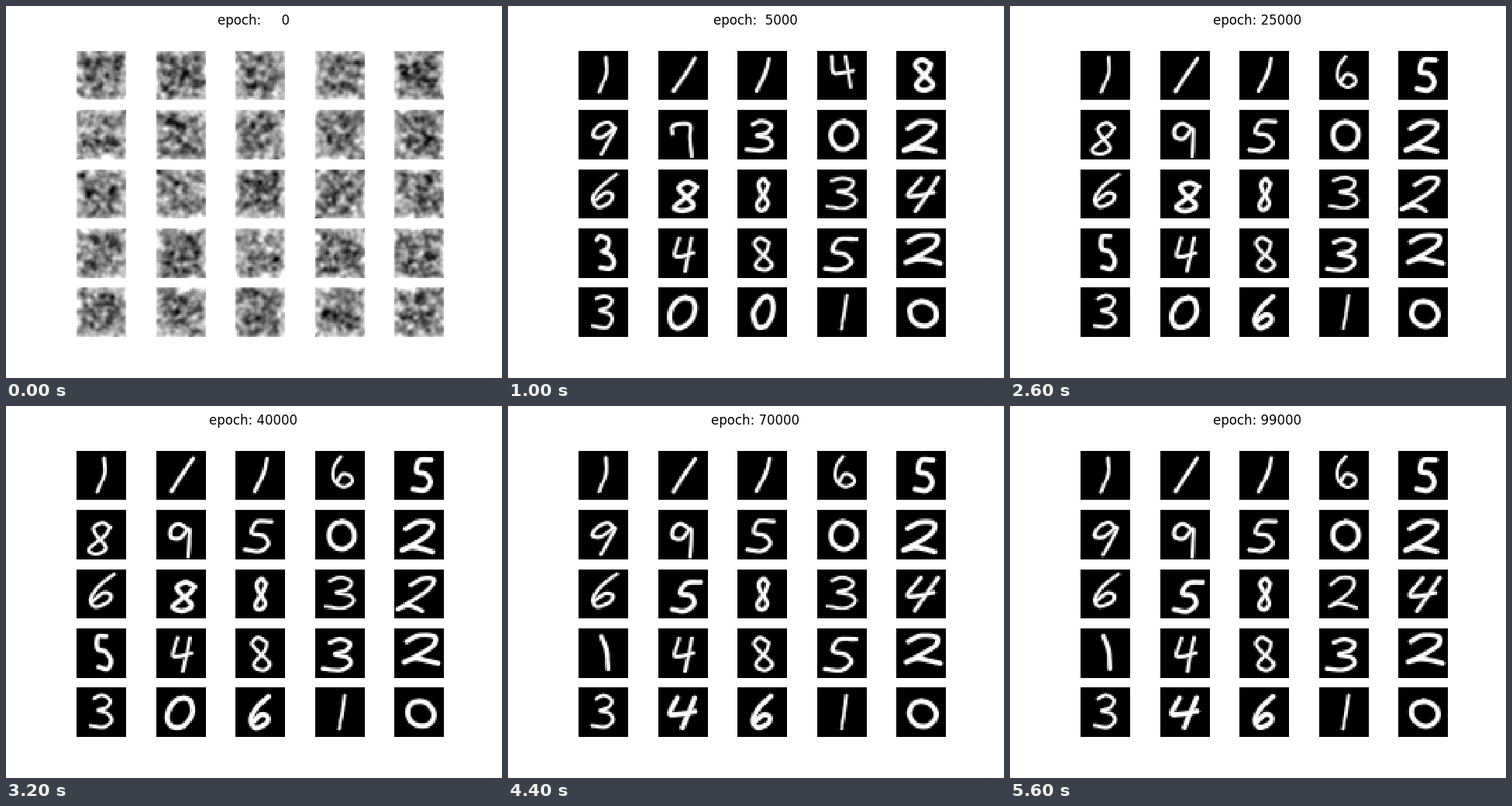
Recreate the animation shown at these times as a matplotlib script. Size 640 by 480 pixels, loop 5800 ms.

```python
import numpy as np
import matplotlib.pyplot as plt
from matplotlib.animation import FuncAnimation

N = 28                      # pixels per side of a tile
UNIT = N / 64               # layout units are 1/64 of a tile
EPOCHS = [*range(0, 10001, 1000), *range(15000, 95001, 5000), 99000]
POSES = np.array([5, 9, 13, 19, 24, 28])   # steps whose digits are known

gy, gx = np.mgrid[:N, :N] + 0.5
turn = np.linspace(-np.pi / 2, 1.5 * np.pi, 13)

# pen strokes in a unit box, y down
GLYPHS = {
    "0": [np.column_stack([0.5 + 0.5 * np.cos(turn), 0.5 + 0.5 * np.sin(turn)])],
    "1": [[(.5, 0), (.65, .45), (.5, 1)]],
    "2": [[(0, .22), (.35, 0), (.8, .05), (.8, .35), (.4, .7), (0, .95), (.3, .85), (.65, .9), (1, 1)]],
    "3": [[(.1, .1), (.5, 0), (.9, .15), (.75, .38), (.35, .48), (.85, .58), (1, .8), (.65, 1), (0, .95)]],
    "4": [[(.15, 0), (0, .5), (.35, .55), (1, .45)], [(.85, 0), (.75, .5), (.65, 1)]],
    "5": [[(1, 0), (.35, .02), (.2, .38), (.7, .48), (.95, .75), (.6, 1), (0, .95)]],
    "6": [[(.7, 0), (.2, .35), (0, .75), (.35, 1), (.85, .85), (.85, .65), (.5, .58), (.15, .8)]],
    "7": [[(0, .3), (.05, .1), (.45, 0), (1, .05), (.85, .45), (.8, 1)]],
    "8": [[(.85, .15), (.4, 0), (.05, .17), (.3, .4), (.95, .8), (.55, 1), (.1, .83), (.7, .4), (.85, .15)]],
    "9": [[(1, .2), (.55, 0), (.1, .15), (0, .4), (.45, .45), (1, .15), (.9, .55), (.7, 1)]],
}


class Tile:
    """A digit per pose, written in one hand: centre, size, slant and pen width."""

    def __init__(self, digits, cx, cy, w, h, slant, pen):
        self.digits, self.pen = digits, pen
        self.centre = np.array([cx, cy]) * UNIT
        self.shape = np.array([[w, 0], [-slant * h, h]]) * UNIT

    def strokes(self, i):
        digit = self.digits[np.abs(POSES - i).argmin()]
        return [self.centre + (np.array(s) - 0.5) @ self.shape for s in GLYPHS[digit]]


TILES = [
    Tile("111111", 31, 32, 30, 43, 0.22, 2.0),
    Tile("111111", 33.5, 32, 0, 42, 0.66, 2.3),
    Tile("111111", 33, 32, 15, 42, 0.38, 2.3),
    Tile("466666", 34, 28, 26, 39, -0.3, 2.0),
    Tile("835555", 36, 32, 24, 39, 0, 2.9),

    Tile("998999", 30, 37, 26, 41, 0.3, 2.1),
    Tile("799999", 32, 39, 25, 42, -0.2, 2.2),
    Tile("335555", 30, 34, 30, 38, 0.1, 2.3),
    Tile("000000", 34, 33, 33, 35, 0, 2.8),
    Tile("222222", 33, 35, 40, 38, 0.2, 2.9),

    Tile("666666", 36, 28, 28, 42, 0.35, 2.1),
    Tile("898555", 36, 36, 28, 37, 0.25, 2.8),
    Tile("868188", 33, 33, 15, 40, 0.1, 2.4),
    Tile("333332", 32, 31, 35, 39, 0.05, 1.9),
    Tile("442444", 31, 33, 32, 42, 0.55, 2.4),

    Tile("335111", 34, 31, 18, 42, -0.2, 2.6),
    Tile("444444", 33, 34, 24, 42, 0.1, 2.1),
    Tile("888888", 33, 33, 24, 42, -0.05, 2.1),
    Tile("533353", 30, 34, 34, 40, 0.15, 2.4),
    Tile("222222", 37, 27, 44, 36, 0.1, 2.8),

    Tile("333333", 32, 31, 26, 41, 0.05, 2.0),
    Tile("000444", 31, 33, 32, 38, 0.25, 2.9),
    Tile("066666", 34, 32, 24, 40, 0.2, 2.9),
    Tile("111111", 34.5, 32, 0, 42, 0.16, 1.9),
    Tile("000000", 34, 34, 34, 32, -0.1, 2.9),
]


def spline(p, n=10):
    """Sample a Catmull-Rom curve through the points."""
    q = np.vstack([2 * p[0] - p[1], p, 2 * p[-1] - p[-2]])
    t = np.linspace(0, 1, n)[:, None]
    return np.vstack([
        b + t / 2 * (c - a + t * (2 * a - 5 * b + 4 * c - d + t * (3 * (b - c) + d - a)))
        for a, b, c, d in zip(q, q[1:], q[2:], q[3:])])


def blur(a):
    p = np.pad(a, 1, "edge")
    p = (p[:-2] + 2 * p[1:-1] + p[2:]) / 4
    return (p[:, :-2] + 2 * p[:, 1:-1] + p[:, 2:]) / 4


def noise(rng):
    """Smooth grey mottling that pales towards the rim."""
    fine, coarse = blur(rng.normal(size=(N, N))), blur(blur(blur(rng.normal(size=(N, N)))))
    z = 0.45 * fine / fine.std() + 0.9 * coarse / coarse.std()
    edge = np.minimum(np.minimum(gx, N - gx), np.minimum(gy, N - gy))
    rim = np.exp(-edge / 2.5)
    return np.clip(0.43 + 0.17 * z * (1 - 0.5 * rim) + 0.4 * rim, 0, 1)


def paint(tile, i, rng):
    """Draw a digit; early steps are shakier and softer."""
    rough = np.exp(-i / 2)
    img = np.zeros((N, N))
    for p in tile.strokes(i):
        c = spline(p + (rough + 0.12) * rng.normal(size=p.shape))
        dist = np.hypot(gx[..., None] - c[:, 0], gy[..., None] - c[:, 1]).min(-1)
        img = np.maximum(img, np.clip(tile.pen / 2 + 0.5 - dist, 0, 1))
    return (1 - rough) * img + rough * blur(img)


fig, axes = plt.subplots(5, 5, figsize=(6.4, 4.8), dpi=100)
fig.subplots_adjust(left=0.125, right=0.9, bottom=0.11, top=0.88, wspace=0.2, hspace=0.2)
title = fig.suptitle("", x=0.4985, fontsize=12, fontfamily="DejaVu Sans")
images = []
for ax in axes.flat:
    ax.axis("off")
    images.append(ax.imshow(np.zeros((N, N)), cmap="gray", vmin=0, vmax=1, interpolation="nearest"))


def update(i):
    title.set_text(f"epoch: {EPOCHS[i]:5d}")
    rng = np.random.default_rng(i)
    for im, tile in zip(images, TILES):
        im.set_data(paint(tile, i, rng) if i else noise(rng))
    return [title, *images]


anim = FuncAnimation(fig, update, frames=len(EPOCHS), interval=200, repeat=True, repeat_delay=0)
plt.show()
```
